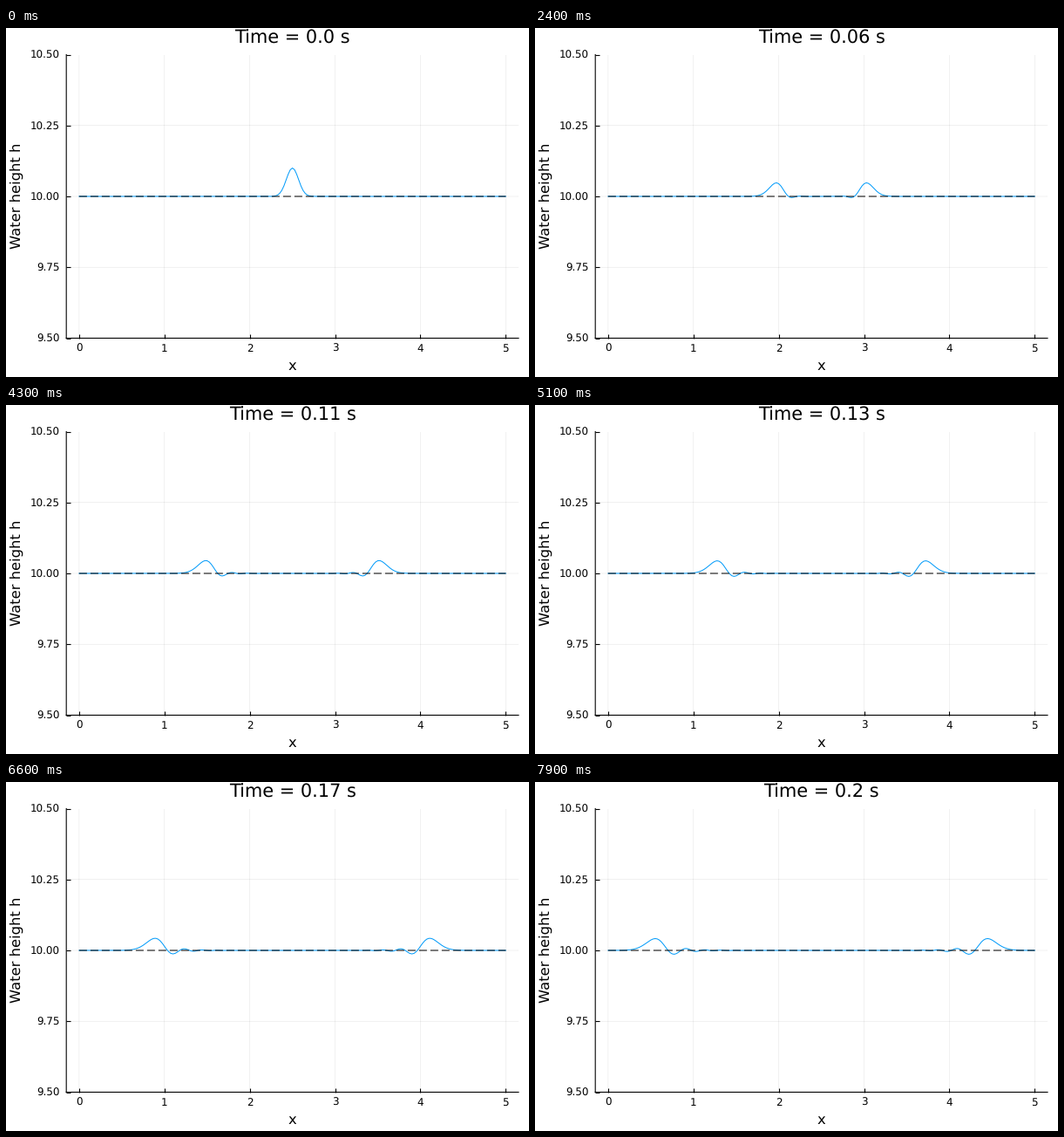
Animation, 600 px wide and 400 px high, one loop 8 s. Source, as a matplotlib script:

```python
import numpy as np
import matplotlib as mpl
import matplotlib.pyplot as plt
from matplotlib.animation import FuncAnimation

mpl.rcParams["font.family"] = "DejaVu Sans"
mpl.rcParams["text.hinting"] = "none"
mpl.rcParams["path.snap"] = False

W, H, DPI = 600, 400, 100
PX = 72 / DPI                       # points per pixel
FRAMES, INTERVAL, HOLD = 80, 100, 2
G, DEPTH, LENGTH, CELLS = 9.81, 10.0, 5.0, 200
FIRST_DT, DT = 0.0005, 0.00266
BLUE = "#009afa"
SMALL, MEDIUM, LARGE = (1.49 * s for s in (8, 11, 14))

x = np.linspace(0, LENGTH, CELLS + 1)
dx = x[1] - x[0]


def slope(f):
    """Central difference with flat ends."""
    f = np.pad(f, 1, mode="edge")
    return (f[2:] - f[:-2]) / (2 * dx)


def rate(state):
    """Shallow water equations for depth and discharge."""
    h, q = state
    return -np.array([slope(q), slope(q * q / h + G * h * h / 2)])


def advance(state, dt):
    a = rate(state)
    b = rate(state + dt / 2 * a)
    c = rate(state + dt / 2 * b)
    d = rate(state + dt * c)
    return state + dt / 6 * (a + 2 * b + 2 * c + d)


def solve(steps):
    bump = 0.1 * np.exp(-((x - LENGTH / 2) / 0.1) ** 2)
    state = np.array([DEPTH + bump, np.zeros_like(x)])
    times, heights = [0.0], [state[0]]
    for n in range(steps):
        dt = FIRST_DT if n == 0 else DT - FIRST_DT if n == 1 else DT
        state = advance(state, dt)
        times.append(times[-1] + dt)
        heights.append(state[0])
    return times, heights


times, heights = solve(FRAMES - 1 - HOLD)

fig = plt.figure(figsize=(W / DPI, H / DPI), dpi=DPI, facecolor="white")
LEFT, RIGHT, TOP, BOTTOM = 69.2, 588.0, 30.5, 355.5
ax = fig.add_axes([LEFT / W, 1 - BOTTOM / H, (RIGHT - LEFT) / W, (BOTTOM - TOP) / H])
ax.set_xlim(-0.15, 5.15)
ax.set_ylim(9.5, 10.5)
ax.set_xticks(range(6))
ax.set_yticks(np.linspace(9.5, 10.5, 5))
ax.tick_params(direction="in", length=5 * PX, width=1.1 * PX,
               labelbottom=False, labelleft=False)
ax.grid(color="black", alpha=0.1, linewidth=0.55 * PX)
ax.set_axisbelow(True)
for side, spine in ax.spines.items():
    spine.set_visible(side in ("left", "bottom"))
    spine.set_linewidth(1.1 * PX)
# Ticks are markers, which need their own snap setting.
for axis in (ax.xaxis, ax.yaxis):
    for tick in axis.get_major_ticks():
        tick.tick1line.set_snap(False)
        tick.gridline.set_snap(False)


def label(px, py, text, size, **kw):
    """Text with its baseline at a pixel position counted from the top left."""
    return fig.text(px / W, 1 - py / H, text, fontsize=size * PX,
                    **{"ha": "center", "va": "baseline", **kw})


for k in range(6):
    label(83.8 + 97.9 * k, 371.2, str(k), SMALL)
for k in range(5):
    label(61.4, 360.1 - 81.25 * k, f"{9.5 + k / 4:.2f}", SMALL, ha="right")
label(328.6, 392, "x", MEDIUM)
label(20.2, 192.4, "Water height h", MEDIUM, rotation=90, ha="right", va="center")
title = label(328.8, 17.4, "", LARGE)

wave, = ax.plot(x, heights[0], color=BLUE, lw=PX, clip_on=False)
ax.plot([0, LENGTH], [DEPTH, DEPTH], color="black", lw=PX,
        dashes=(9, 4), dash_capstyle="butt")


def update(i):
    n = max(0, i - HOLD)
    wave.set_ydata(heights[n])
    title.set_text(f"Time = {round(times[n], 2)} s")
    return wave, title


anim = FuncAnimation(fig, update, frames=FRAMES, interval=INTERVAL,
                     repeat=True, repeat_delay=0, blit=False)
plt.show()
```
